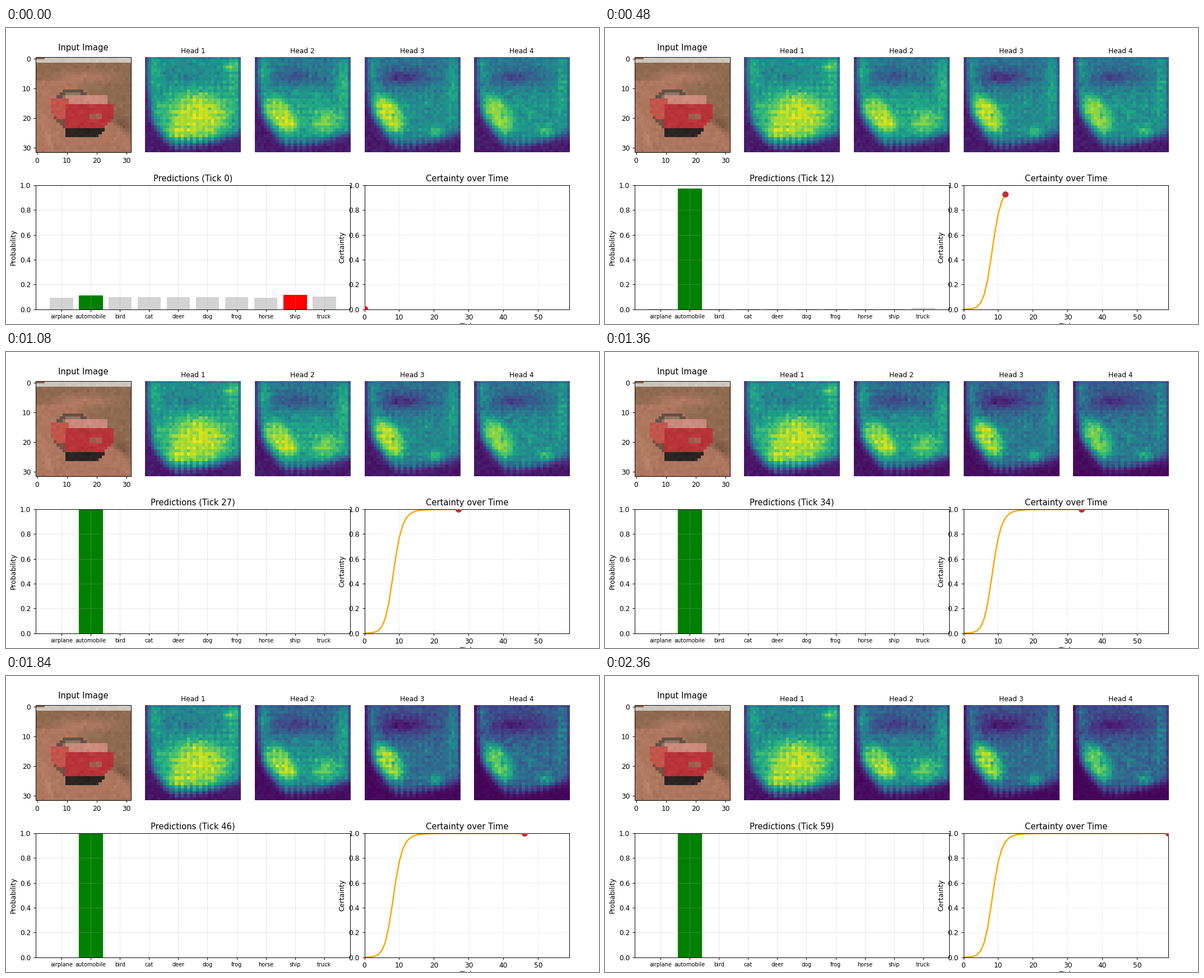
A matplotlib script that plays this animation: 1058x529 px, repeating every 2400 ms.

```python
import numpy as np
import matplotlib.pyplot as plt
from matplotlib.animation import FuncAnimation
from matplotlib.colors import to_rgb

TICKS = 60
CLASSES = ["airplane", "automobile", "bird", "cat", "deer",
           "dog", "frog", "horse", "ship", "truck"]
rng = np.random.default_rng(4)
Y, X = np.mgrid[0:32, 0:32].astype(float)


def sigmoid(z):
    return 1 / (1 + np.exp(-z))


def blob(cx, cy, sx, sy, angle=0.0, power=2):
    """Bell-shaped patch; a higher power gives a flatter top."""
    a = np.radians(angle)
    u = ((X - cx) * np.cos(a) + (Y - cy) * np.sin(a)) / sx
    v = ((Y - cy) * np.cos(a) - (X - cx) * np.sin(a)) / sy
    return np.exp(-0.5 * np.hypot(u, v) ** power)


def box(x0, x1, y0, y1):
    return (X >= x0) & (X <= x1) & (Y >= y0) & (Y <= y1)


# ---- input picture -------------------------------------------------------

def make_photo():
    img = np.empty((32, 32, 3))
    img[:] = to_rgb("#ad765e")

    def paint(mask, color, strength=1.0):
        m = (mask * strength)[..., None]
        img[:] = img * (1 - m) + np.array(to_rgb(color)) * m

    # hillside, track and sky
    hill = sigmoid(X - 14) * sigmoid(18 - Y + 0.8 * (X - 24)) + (Y < 8)
    paint(hill.clip(0, 1), "#8b694e", 0.9)
    paint(blob(15, 6.5, 7, 1.5), "#b57b64", 0.9)
    paint(blob(28, 21.5, 3.5, 1.2, 38), "#755541", 0.85)
    paint(blob(3, 25, 0.9, 5, -15), "#c08a70", 0.6)
    paint((Y < 2) & (X + 3 * Y > 2), "#cfc8be")
    # car, from the windscreen down to the shadow
    ring = np.hypot((X - 12) / 5, (Y - 14) / 3.3)
    paint((ring < 1.1) & (Y < 14), "#8b7561")
    paint((ring < 1.1) & (ring > 0.8) & (Y < 14), "#5d4a41", 0.85)
    paint(box(6, 10, 19, 24) & (Y < X + 15), "#6c463b", 0.85)
    paint(box(8, 23, 13, 15) & (X + Y > 22), "#cb8a7c")
    paint(box(5, 10, 14, 20) & (Y < X + 13.5), "#c2554c")
    paint(box(10, 25, 16, 23) & (X + Y < 46), "#b93438")
    paint(box(18, 21, 19, 20), "#9c6a56", 0.8)
    paint(box(10, 22, 24, 26) & (X + Y < 47), "#2b2422")
    img += rng.normal(0, 0.012, (32, 32, 1))
    return img.clip(0, 1)


# ---- attention maps ------------------------------------------------------

def make_head(field, corner):
    """Textured field inside an outline that cuts off the lower corners."""
    texture = 0.025 * (np.cos(np.pi * X) + np.cos(np.pi * Y))
    field = field * (1 + texture) + rng.normal(0, 0.035, field.shape)
    stripes = 0.8 * np.cos(np.pi * X)
    outline = (sigmoid(2 * (X - 0.4 - 0.1 * np.clip(Y - 8, 0, 10)))
               * sigmoid(1.35 * X - Y + corner)
               * sigmoid(29 - Y + stripes)
               * sigmoid(1.2 * (36 - 0.35 * X - Y))
               * (1 - 0.3 * (X > 30)) * (1 - 0.2 * (Y < 1)))
    edge = 0.04 + 0.06 * rng.random(field.shape)
    return (edge + (field - 0.06) * outline).clip(0, 0.97)


block = blob(17.5, 20, 7.5, 7, 0, 4)
halo = blob(16, 19, 12, 8, 0, 4)
diagonal = blob(7.5, 18.7, 3.5, 6.2, -33, 4)
core = blob(12, 21.5, 2.2, 2.2)
right_lobe = blob(23.5, 21.5, 4.2, 3.5, 0, 3)
speck = blob(23.3, 24.8, 1.9, 1.5)
hole = blob(9.2, 19, 0.9, 0.9)
rims = blob(29, 9, 1.7, 8) + blob(2.5, 5, 1.4, 4)
sky = blob(13, 6, 7, 2.8) + 0.6 * blob(12.5, 6.6, 3, 0.8)

HEADS = [
    make_head(0.51 + 0.17 * halo + 0.21 * block + 0.10 * rims - 0.06 * sky
              + 0.20 * blob(9.5, 25.5, 2, 1.8) + 0.2 * blob(28, 2.8, 2, 0.9), 18.6),
    make_head(0.43 + 0.13 * halo + 0.30 * diagonal + 0.14 * core
              + 0.22 * right_lobe + 0.20 * rims - 0.13 * sky, 17),
    make_head(0.41 + 0.07 * halo + 0.43 * diagonal - 0.22 * hole
              + 0.24 * speck + 0.15 * rims - 0.20 * sky, 17),
    make_head(0.43 + 0.08 * halo + 0.34 * diagonal - 0.20 * hole
              + 0.22 * speck + 0.14 * rims - 0.16 * sky, 16.5),
]


def head_at(i, tick):
    """Later ticks sharpen each map: weak areas sink, peaks stay."""
    focus = 0.8 * sigmoid((tick - 34) / 2) + 0.2 * tick / (TICKS - 1)
    return HEADS[i] ** (1 + 0.17 * (i + 0.7) * focus)


# ---- predictions ---------------------------------------------------------

WEIGHTS = {"automobile": 0.50, "truck": 0.11, "ship": 0.075,
           "airplane": 0.032, "horse": 0.03}
LOGITS = np.log([WEIGHTS.get(name, 0.054) for name in CLASSES])
TRUE_CLASS, SHIP = CLASSES.index("automobile"), CLASSES.index("ship")


def softmax(z):
    e = np.exp(z - z.max())
    return e / e.sum()


def certainty_of(p):
    """One minus the normalised entropy."""
    return 1 + np.sum(p * np.log(p + 1e-30)) / np.log(len(p))


ticks = np.arange(TICKS)
rise = np.minimum(ticks - 8.4, 19.5)
certainty = sigmoid(0.78 * rise - 0.02 * rise ** 2)

# Scale of the logits that yields each tick's certainty
gains = np.linspace(0, 8, 1500)
gain_at = np.interp(certainty, [certainty_of(softmax(LOGITS * g)) for g in gains], gains)


def probabilities(tick):
    logits = LOGITS * gain_at[tick]
    logits[SHIP] += 0.14 * np.exp(-2 * tick)
    return softmax(logits)


# ---- figure --------------------------------------------------------------

plt.rcParams["font.family"] = "DejaVu Sans"
fig = plt.figure(figsize=(12, 6), dpi=1058 / 12, facecolor="white")
grid = fig.add_gridspec(2, 5, left=0.05, right=0.95, bottom=0.05, top=0.95,
                        wspace=0.15, hspace=0.15)

photo_ax = fig.add_subplot(grid[0, 0])
photo_ax.imshow(make_photo(), interpolation="nearest")
photo_ax.set_title("Input Image", y=1.0, pad=10)
photo_ax.set_xticks(range(0, 32, 10))
photo_ax.set_yticks(range(0, 32, 10))

maps = []
for i, head in enumerate(HEADS):
    ax = fig.add_subplot(grid[0, i + 1])
    maps.append(ax.imshow(head, cmap="viridis", vmin=0, vmax=1,
                          interpolation="nearest"))
    ax.set_title(f"Head {i + 1}", fontsize=10)
    ax.axis("off")

bar_ax = fig.add_subplot(grid[1, 0:3])
bars = bar_ax.bar(CLASSES, np.full(len(CLASSES), 0.1))
bar_ax.set_ylim(0, 1)
bar_ax.tick_params(axis="x", labelsize=8)
bar_ax.set_ylabel("Probability")
bar_ax.grid(True, alpha=0.3)
bar_title = bar_ax.set_title("Predictions (Tick 0)")

line_ax = fig.add_subplot(grid[1, 3:5])
line, = line_ax.plot([], [], color="orange", lw=2)
dot, = line_ax.plot([], [], "o", ms=8, zorder=3)
line_ax.set_xlim(0, TICKS - 1)
line_ax.set_ylim(0, 1)
line_ax.set_xticks(range(0, TICKS, 10))
line_ax.set_xlabel("Tick", labelpad=2.5)
line_ax.set_ylabel("Certainty")
line_ax.set_title("Certainty over Time")
line_ax.grid(True, linestyle="--", alpha=0.3)


def update(tick):
    for i, im in enumerate(maps):
        im.set_data(head_at(i, tick))

    probs = probabilities(tick)
    guess = probs.argmax()
    for k, bar in enumerate(bars):
        marked = k in (TRUE_CLASS, guess)
        color = "green" if k == TRUE_CLASS else "red" if marked else "lightgray"
        bar.set_height(probs[k])
        bar.set_facecolor(color)
        bar.set_edgecolor(color if marked else "none")
        bar.set_linewidth(1 if marked else 0)
    bar_title.set_text(f"Predictions (Tick {tick})")

    line.set_data(ticks[:tick + 1], certainty[:tick + 1])
    dot.set_data([tick], [certainty[tick]])
    dot.set_color("red" if tick == 0 else "#c03036")
    return [*maps, *bars, bar_title, line, dot]


anim = FuncAnimation(fig, update, frames=TICKS, interval=40, repeat=True,
                     repeat_delay=0, blit=False)
plt.show()
```
